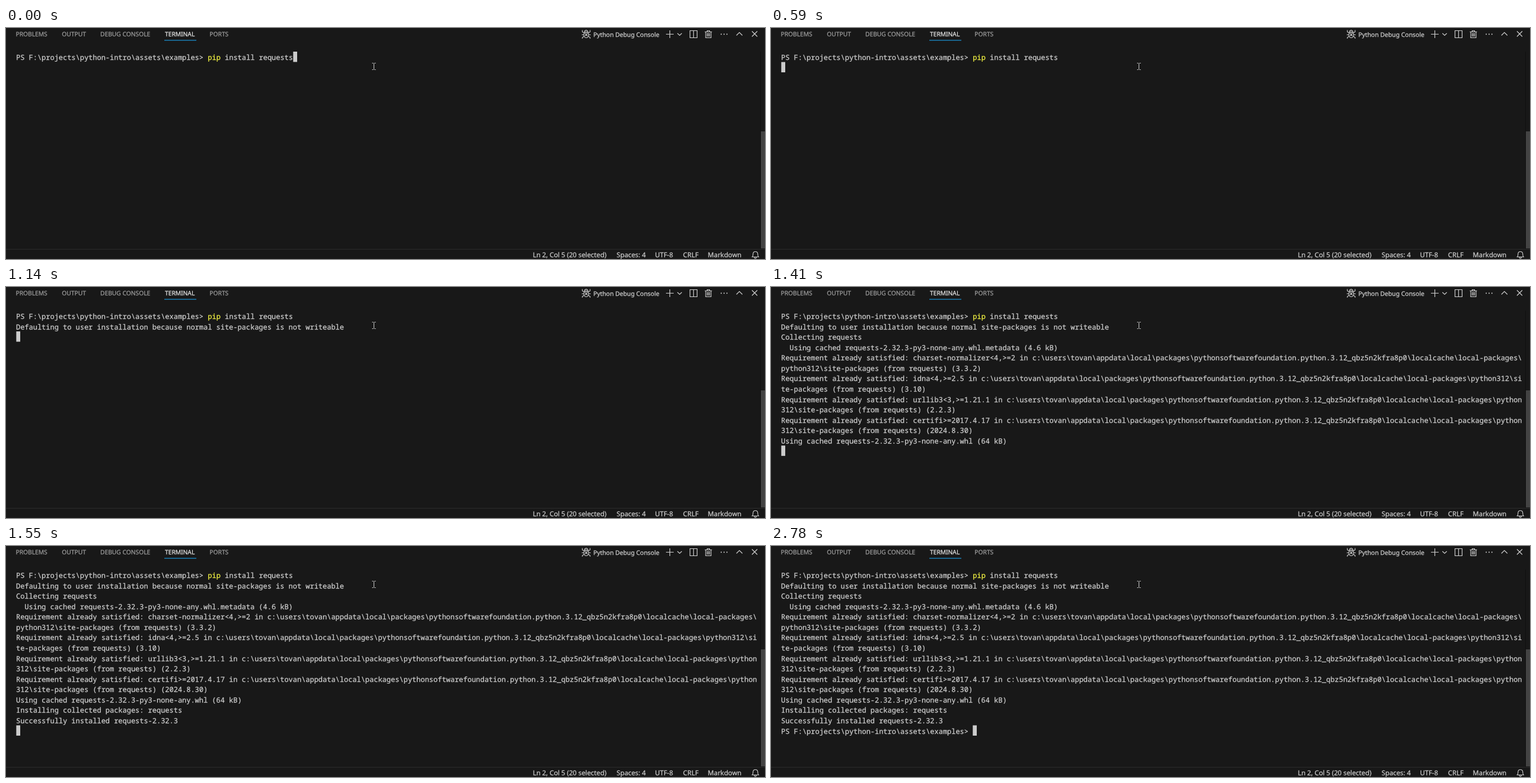
An HTML page that plays this animation: 1280 px wide and 391 px high, repeating every 3.47 s.

```html
<!DOCTYPE html>
<html lang="en">
<head>
<meta charset="utf-8">
<title>Terminal</title>
<style>
  html, body { margin: 0; width: 100%; height: 100%; overflow: hidden; background: #181818; }
  svg { display: block; }
  text { white-space: pre; text-rendering: geometricPrecision; stroke-width: .25px; }
  .term { font: 11.975px "Noto Sans Mono", monospace; fill: #d0d0d0; stroke: #d0d0d0; }
  .ui { font-family: "Noto Sans", "Open Sans", sans-serif; fill: #ccc; stroke: #ccc; }
  .tabs { font-size: 10.25px; fill: #9d9d9d; stroke: #9d9d9d; }
  .tabs .active { fill: #e7e7e7; stroke: #e7e7e7; }
  .title { font-size: 10.38px; }
  .status { font-size: 11.3px; }
  .icons { fill: none; stroke: #ccc; stroke-width: 1.15; }
  .command { fill: #f5f543; stroke: #f5f543; }
</style>
</head>
<body>
<svg width="1280" height="391" viewBox="0 0 1280 391">
  <rect width="1280" height="391" fill="#181818"/>

  <g class="ui tabs">
    <text x="16.5" y="14">PROBLEMS</text>
    <text x="94.3" y="14">OUTPUT</text>
    <text x="159" y="14">DEBUG CONSOLE</text>
    <text x="268" y="14" class="active">TERMINAL</text>
    <text x="343.3" y="14">PORTS</text>
  </g>
  <rect x="267" y="20" width="54" height="1.5" fill="#1a7bb0"/>
  <text class="ui title" x="990.4" y="15">Python Debug Console</text>

  <g class="icons">
    <!-- bug -->
    <ellipse cx="978.5" cy="11.5" rx="4" ry="5"/>
    <path d="M975.5 7.5a3 3.6 0 0 1 6 0M975 8h7M976.5 9.5l4 4m0-4l-4 4M974.5 11.5h-3.5M982.5 11.5h3.5M975 8.5l-3-2v-3M982 8.5l3-2v-3M975 14l-3 2v2M982 14l3 2v2"/>
    <!-- new terminal -->
    <path d="M1119.5 4v13M1113 10.5h13"/>
    <path d="M1132.3 9l3.7 3.5 3.7-3.5"/>
    <!-- split -->
    <path d="M1153.5 4.5h12v12h-12zM1159.5 4.5v12"/>
    <!-- trash -->
    <path d="M1178.5 6.5h12M1182.5 6.5v-2h4v2M1180 6.5v10h9v-10M1182.5 8.5v6M1184.5 8.5v6M1186.5 8.5v6"/>
    <path d="M1231.8 12.5l5-5 5 5M1258 5.5l9 9m0-9l-9 9"/>
    <g fill="#ccc" stroke="none">
      <circle cx="1206.2" cy="10.5" r="1"/>
      <circle cx="1211" cy="10.5" r="1"/>
      <circle cx="1215.8" cy="10.5" r="1"/>
    </g>
    <!-- bell -->
    <path d="M1258.5 387.5c1-1 1.3-2 1.3-4.5c0-6 8-6 8 0c0 2.5.3 3.5 1.3 4.5zM1262 388c0 2.4 3.5 2.4 3.5 0"/>
  </g>

  <rect x="1272" y="40" width="1" height="334" fill="#0f0f0f"/>
  <rect x="1273" y="175" width="7" height="198" fill="#434343"/>
  <rect y="374" width="1280" height="1" fill="#2b2b2b"/>

  <g class="ui status">
    <text x="888.5" y="388">Ln 2, Col 5 (20 selected)</text>
    <text x="1029.8" y="388">Spaces: 4</text>
    <text x="1094.4" y="388">UTF-8</text>
    <text x="1141.8" y="388">CRLF</text>
    <text x="1183.6" y="388">Markdown</text>
  </g>

  <g id="rows" class="term"></g>
  <rect id="cursor" width="6.7" height="17.45" fill="#ccc"/>

  <!-- mouse pointer -->
  <path d="M617.5 59.5h2l1 1 1-1h2M620.5 60.5v9M617.5 70.5h2l1-1 1 1h2" fill="none" stroke="#ccc"/>
</svg>
<script>
const LEFT = 17, COL = 7.185, ROW = 17.57, COLUMNS = 174, LOOP = 3470;
const BASELINE = 54, CURSOR_TOP = 40, CURSOR_INSET = 0.3;

const prompt = String.raw`PS F:\projects\python-intro\assets\examples> `;
const sitePath = String.raw`c:\users\tovan\appdata\local\packages\pythonsoftwarefoundation.python.3.12_qbz5n2kfra8p0\localcache\local-packages\python312\site-packages`;

const satisfied = (spec, version) =>
  `Requirement already satisfied: ${spec} in ${sitePath} (from requests) (${version})`;

const output = [
  prompt,
  "Defaulting to user installation because normal site-packages is not writeable",
  "Collecting requests",
  "  Using cached requests-2.32.3-py3-none-any.whl.metadata (4.6 kB)",
  satisfied("charset-normalizer<4,>=2", "3.3.2"),
  satisfied("idna<4,>=2.5", "3.10"),
  satisfied("urllib3<3,>=1.21.1", "2.2.3"),
  satisfied("certifi>=2017.4.17", "2024.8.30"),
  "Using cached requests-2.32.3-py3-none-any.whl (64 kB)",
  "Installing collected packages: requests",
  "Successfully installed requests-2.32.3",
  prompt
];

// Start time, rows shown, cursor row and column
const steps = [
  [0, 1, 0, 65],
  [590, 1, 1, 0],
  [1140, 2, 2, 0],
  [1410, 13, 13, 0],
  [1480, 14, 14, 0],
  [1550, 15, 15, 0],
  [1750, 16, 15, 45]
];

const rowsGroup = document.getElementById("rows");
const cursor = document.getElementById("cursor");

const wrap = line => {
  const parts = [];
  for (let i = 0; i < line.length; i += COLUMNS) parts.push(line.slice(i, i + COLUMNS));
  return parts;
};

function addText(parent, tag, content, col, row) {
  const el = document.createElementNS("http://www.w3.org/2000/svg", tag);
  el.setAttribute("x", LEFT + col * COL);
  el.setAttribute("y", Math.round(BASELINE + row * ROW));
  el.textContent = content;
  parent.append(el);
  return el;
}

const rows = output.flatMap(wrap).map((line, i) => addText(rowsGroup, "text", line, 0, i));
addText(rows[0], "tspan", "pip", 45, 0).setAttribute("class", "command");
addText(rows[0], "tspan", "install requests", 49, 0);

let current;
function show(step) {
  if (step === current) return;
  current = step;
  const [, count, row, col] = step;
  rows.forEach((el, i) => el.setAttribute("visibility", i < count ? "visible" : "hidden"));
  cursor.setAttribute("x", Math.round(LEFT + col * COL) + CURSOR_INSET);
  cursor.setAttribute("y", CURSOR_TOP + row * ROW);
}

const start = performance.now();
function tick() {
  const t = (performance.now() - start) % LOOP;
  show(steps.findLast(([at]) => at <= t));
  requestAnimationFrame(tick);
}
tick();
</script>
</body>
</html>
```
